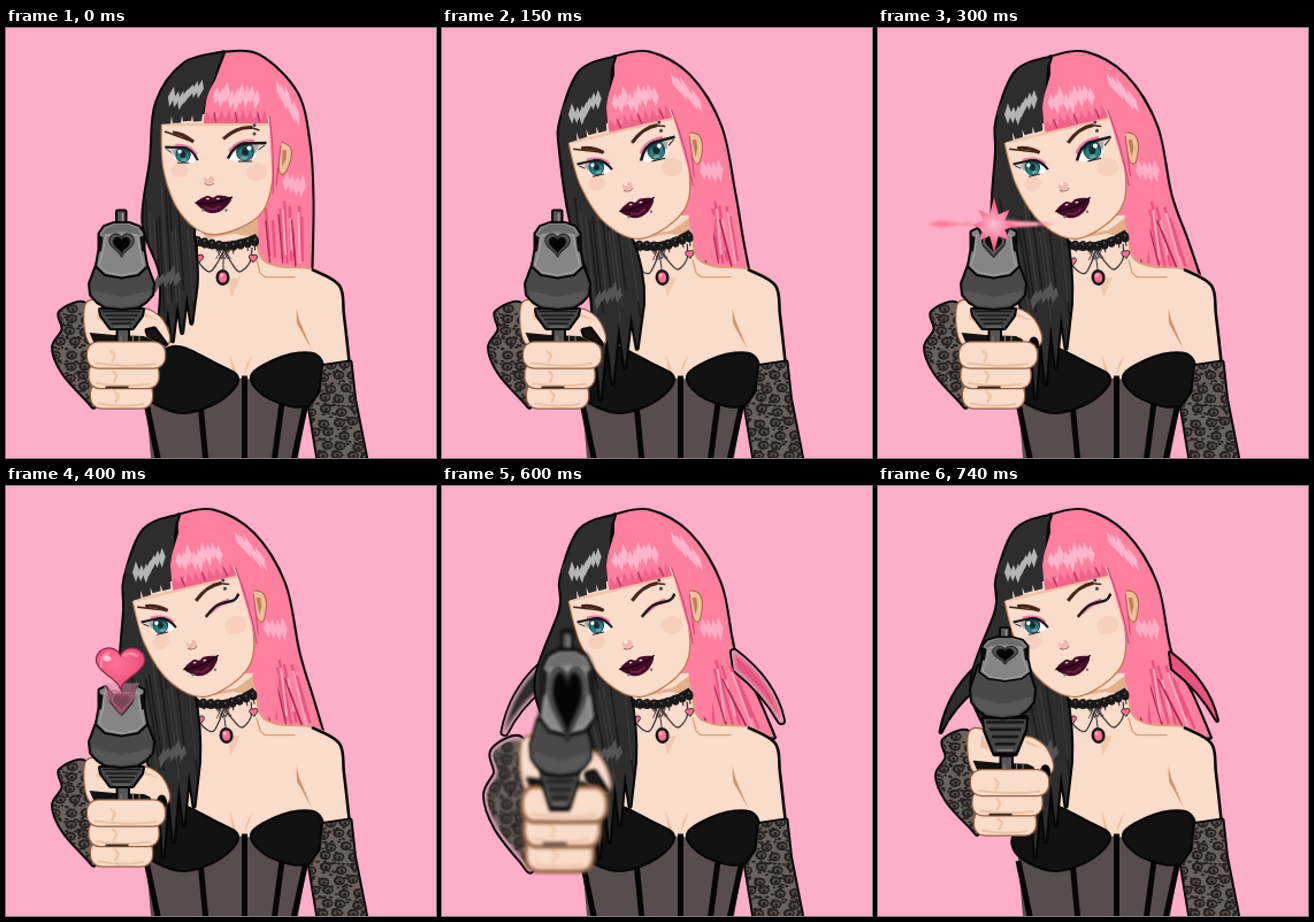
Write an HTML page with a canvas that moves like this. It is 748 px wide and 748 px high and loops after 0.8 s.

```html
<!DOCTYPE html>
<html lang="en">
<meta charset="utf-8">
<title>Heart shot</title>
<style>
html, body { margin: 0; width: 100%; height: 100%; overflow: hidden; background: #ffaec9 }
canvas { display: block; width: 748px; height: 748px; image-rendering: pixelated }
</style>
<canvas id="stage" width="374" height="374"></canvas>
<script>
const ctx = document.getElementById('stage').getContext('2d');
const SKIN = '#fadccb', TAN = '#d9a078', BROWN = '#94603f', INK = '#050505';
const HAIR = '#2d2d2d', PINK = '#ff7f9f', ROSE = '#e9557e', WINE = '#a82c55';

// ---------- helpers ----------
let seed;
const rand = () => (seed = seed * 16807 % 2147483647) / 2147483647;
const mix = (a, b, t) => a + (b - a) * t;

const fill = (color, d) => { ctx.fillStyle = color; ctx.fill(new Path2D(d)); };
const line = (color, width, d) => {
  ctx.strokeStyle = color; ctx.lineWidth = width; ctx.stroke(new Path2D(d));
};
const shape = (color, d, edge = INK, width = 8) => { line(edge, width, d); fill(color, d); };
const oval = (color, x, y, rx, ry = rx) => {
  ctx.fillStyle = color; ctx.beginPath(); ctx.ellipse(x, y, rx, ry, 0, 0, 7); ctx.fill();
};
const group = (draw, x, y, sx = 1, sy = 1, ox = x, oy = y, turn = 0) => {
  ctx.save();
  ctx.translate(x, y); ctx.rotate(turn * Math.PI / 180); ctx.scale(sx, sy); ctx.translate(-ox, -oy);
  draw();
  ctx.restore();
};
// hard offset outline around a blurred shape
const ghost = (color, d) => {
  line(INK, 16, d); line('#dc9fb3', 9, d);
  ctx.filter = 'blur(1.5px)'; fill(color, d); ctx.filter = 'none';
};

const pairs = text => text.match(/-?[\d.]+ -?[\d.]+/g).map(p => p.split(' ').map(Number));
// curve running through all given points
function smooth(text, closed) {
  const p = pairs(text), n = p.length;
  const at = i => p[closed ? (i + n) % n : Math.max(0, Math.min(n - 1, i))];
  let d = 'M' + p[0];
  for (let i = 0; i < n - !closed; i++) {
    const [a, b, c, e] = [-1, 0, 1, 2].map(k => at(i + k));
    d += `C${[0, 1].map(k => b[k] + (c[k] - a[k]) / 6)} ${[0, 1].map(k => c[k] - (e[k] - b[k]) / 6)} ${c}`;
  }
  return d;
}
// symmetric outline from half widths and heights
function mirror(text, axis = 201) {
  const half = pairs(text);
  const side = s => half.map(([w, y]) => [axis + s * w, y]);
  return 'M' + [...side(1), ...side(-1).reverse()].join('L') + 'Z';
}
// row of hair ends along a slope; flat > 0 makes them blunt
function tips(x0, y0, x1, y1, n, long, short = long, flat = 0) {
  let d = '';
  for (let i = 0; i < n; i++) {
    const len = mix(long, short, i / n) * (.8 + rand() * .3);
    for (const [k, l] of [[.5 - flat / 2, len], [.5 + flat / 2, len], [1, 0]]) {
      const t = (i + k) / n;
      d += `L${mix(x0, x1, t)} ${mix(y0, y1, t) + l}`;
    }
  }
  return d;
}
// row of slanted blades of light or shade
function blades(color, x, y, w, rise, h, n, lean = 0) {
  for (let i = 0; i < n; i++) {
    const bx = x + w * i / n, by = y + rise * i / n + (rand() - .5) * h * .5;
    const half = h * (.35 + rand() * .25), thick = w / n * .75;
    fill(color, `M${bx + lean} ${by - half}L${bx + thick} ${by} ${bx - lean} ${by + half} ${bx - thick} ${by}Z`);
  }
}
function strands(color, width, n, x0, x1, y0, x2, x3, y1) {
  for (let i = 0; i < n; i++) {
    const t = (i + rand()) / n, from = rand() * .4, to = .75 + rand() * .25;
    const x = k => mix(mix(x0, x1, t), mix(x2, x3, t), k);
    line(color, width, `M${x(from)} ${mix(y0, y1, from)}L${x(to)} ${mix(y0, y1, to)}`);
  }
}
function heart(x, y, w, h) {
  let d = '';
  for (let a = 0; a < 6.28; a += .1) {
    const hx = Math.sin(a) ** 3;
    const hy = (13 * Math.cos(a) - 5 * Math.cos(2 * a) - 2 * Math.cos(3 * a) - Math.cos(4 * a) + 2.5) / 29;
    d += `${d ? 'L' : 'M'}${x + hx * w / 2} ${y - hy * h}`;
  }
  return d + 'Z';
}

function lace(d, x0, y0, w, h, soft) {
  (soft ? ghost : shape)('#6b625f', d);
  ctx.save();
  ctx.clip(new Path2D(d));
  if (soft) ctx.filter = 'blur(1px)';
  for (let y = y0; y < y0 + h; y += 20) {
    for (let x = x0 + rand() * 14; x < x0 + w; x += 26) {
      const px = x + rand() * 6, py = y + rand() * 8;
      oval('#262222', px, py, 10, 8);
      oval('#5d5451', px + 1, py, 6, 4);
      oval('#262222', px + 1, py + 1, 3);
      for (let i = 0; i < 5; i++) oval('#262222', px + (rand() - .5) * 34, py + 8 + rand() * 8, 2 + rand() * 2, 2);
    }
  }
  ctx.restore();
}

// ---------- body ----------
function body() {
  const shoulder = smooth('436 325 440 392 470 414 535 420 580 448 588 500 597 580');
  fill(SKIN, shoulder + 'L545 600 280 620 280 450 328 400 328 330Z');
  line(TAN, 3, shoulder);
  line(INK, 5, smooth('532 420 580 448 588 500 597 580'));
  fill('#e3b08b', 'M330 342 362 358 400 352 437 325 438 364 396 358 350 366Z');
  line(TAN, 2.5, 'M436 403 442 426 450 433H503');
  fill('#f0c9ae', 'M384 436 408 434 392 468Z');
  fill('#e9b893', 'M389 566 402 604 394 594ZM429 568 414 606 419 585Z');
  fill('#cf966e', 'M505 487 510 507 532 560 506 514Z');

  fill('#584d4e', 'M243 640 252 748 508 748 525 650 415 608Z');
  for (const x of [244, 338, 415, 480, 522]) line(INK, 10, `M${x} ${x === 415 ? 605 : 652}L${mix(x, 415, x < 415 ? .12 : .2)} 750`);
  shape('#111', smooth('290 556 366 586 402 610 373 646 308 668 248 644 238 606', true));
  shape('#111', smooth('428 606 480 574 534 568 550 598 525 655 460 644', true));
  lace('M552 588 599 581 606 645 627 752 543 752 528 660 547 634Z', 520, 582, 110, 170);
}

function choker() {
  const axis = 383;
  line('#181818', 13, 'M329 370Q383 390 437 364');
  for (let i = -4; i <= 4; i++) {
    const x = axis + i * 12.5, y = 381 - Math.abs(i) * 2.5;
    oval('#181818', x, y, 7, 9);
    oval('#6a5a54', x, y - 3, 1.8);
    line('#222', 2, `M${x} ${y}V${y + 8 + rand() * 14}`);
  }
  for (let i = 0; i < 4; i++) line('#433', 1.6, `M${366 + i * 5} 386L${376 + i * 5} 402M${390 - i * 5} 386L${380 - i * 5} 402`);
  for (const s of [-1, 1]) {
    line('#333', 2.5, smooth([[48, 382], [44, 408], [26, 424], [12, 408], [2, 390]].map(([w, y]) => `${axis - 3 + s * w} ${y}`).join(' ')));
    shape('#ff6f91', heart(axis + s * 47, 401, 13, 12), '#222', 3);
  }
  line('#333', 2, 'M378 398V424');
  oval('#151515', 377, 434, 12, 14);
  oval('#ff6f91', 377, 434, 7, 9);
  oval('#ffb3c7', 375, 430, 3);
}

// ---------- hair ----------
function pinkHair({ tilt, right, locks }) {
  const tipY = 419 + Math.max(0, right - 532) * .4;
  const dome = tilt
    ? `300 51 360 43 430 83 484 170 509 290 ${mix(509, right, .55)} 365 ${right} ${tipY}`
    : `378 43 440 48 505 112 527 200 533 300 ${right} ${tipY}`;
  shape(PINK, smooth(dome) + 'L470 420 440 400 300 300Z');
  if (locks) locks(ROSE, 'M508 290Q575 340 590 408Q560 355 512 318Z');
  const top = tilt ? 500 : 522;
  strands(ROSE, 5, 7, 450, top, 290, 460, right - 8, tipY);
  strands('#ffa5bd', 4, 3, 470, top, 290, 480, right - 8, tipY);
  strands(WINE, 2.5, 4, 450, top - 10, 320, 460, right - 12, tipY);
}

function blackHair({ tilt, left, ends, locks }) {
  if (locks) locks(HAIR, 'M172 314Q122 360 109 428Q130 385 170 352Z');
  const crown = tilt ? '300 51 240 76 207 160 206 215' : '378 43 310 62 262 130 252 230';
  const d = smooth(`${crown} ${left} 340 ${left + 30} 430 265 530`)
    + (tilt ? tips(265, 550, ends, 480, 4, 115, 50) : tips(265, 500, ends, 450, 4, 70, 50))
    + `Q${ends + 3} 420 326 358L340 200 ${tilt ? '290 130 294 70' : '344 130 360 90'}Z`;
  shape(HAIR, d);
  ctx.save();
  ctx.clip(new Path2D(d));
  strands('#1b1b1b', 3, 7, left, 310, 250, 250, ends, 520);
  strands('#3a3a3a', 3, 6, left, 310, 250, 250, ends, 520);
  ctx.restore();
  blades('#555', tilt ? 272 : 262, tilt ? 468 : 440, 44, -10, 32, 5, 3);
}

// ---------- head ----------
const lid = 'M-30 12Q-18 -13 0 -14T37 -15';
function eye() {
  line('#e77a9f', 7, 'M-27 0Q-14 -20 16 -18');
  fill('#fff', 'M-30 12Q-18 -13 0 -14L24 -11 19 8 4 17 -20 16Z');
  fill('#aaa', 'M11 -12 24 -11 18 5Z');
  oval('#1c4a52', 0, 0, 16, 17);
  oval('#2f7d80', 0, 4, 13, 11);
  oval('#102c34', 0, 0, 6, 7);
  oval('#69a9a8', -2, 11, 6, 3);
  oval('#fff', 7, -6, 4);
  line('#17171a', 5, lid);
  line('#17171a', 2, 'M-12 17 12 17M23 -3 34 -11');
}
function closedEye() {
  line('#e77a9f', 7, 'M-18 8Q-3 -8 16 -14');
  line('#17171a', 5, smooth('-25 15 -5 -5 24 -14 32 -25'));
}

function head(winking, turn) {
  const face = smooth('272 150 275 245 305 322 360 358 440 325 464 250 462 150');
  line('#bb7c50', 5, face);
  fill(SKIN, face);
  line('#efc5a8', 5, 'M277 168H458');
  oval('#f7cfbd', 302, 248, 15, 13);
  oval('#f7cfbd', 436, 250, 19, 16);
  group(eye, 308, 220, -.85, .85, 0, 0);
  if (winking) group(closedEye, 416, 215, 1, 1, 0, 0, -turn);
  else group(eye, 416, 215, 1, 1, 0, 0);
  line('#472318', 6, 'M326 198Q308 183 290 182M378 193Q402 171 428 173');
  line('#472318', 3, 'M326 198 276 180M426 173 441 178');
  for (const y of [169, 184]) oval('#444', 432, y, 3);

  oval('#f3b7ad', 353, 264, 9, 7);
  oval('#fff0ea', 351, 260, 3);
  line('#9a716b', 2, 'M345 270Q353 277 362 270');
  fill('#430a28', smooth('331 303 350 292 360 295 370 291 392 297 376 317 356 322 340 314', true));
  line('#170611', 3, 'M329 304Q362 309 394 294');
  line('#74244b', 3, 'M347 312 360 316 374 310');
  for (const x of [351, 369]) oval('#f4d4df', x, 297, 3, 1.5);
  for (const x of [343, 383]) oval('#777', x, 317, 2.5);

  // ear, fringe with side lock, shine
  shape('#efc09b', smooth('477 203 493 207 495 226 484 252 476 246', true), '#a8663e', 4);
  fill('#bb7e56', 'M481 212 488 213 487 228 480 242Z');
  const fringe = 'M376 70 350 115 344 156' + tips(344, 146, 456, 148, 5, 18, 18, .8) + 'L458 160 464 290 472 270 479 200 476 130 440 80Z';
  fill(PINK, fringe);
  fill('#f0648a', 'M344 158' + tips(344, 158, 456, 160, 9, -16) + 'V166H344Z');
  for (const x of [362, 399, 438]) line(WINE, 2, `M${x} 147l3 17`);
  line('#c8426c', 2, 'M458 152Q468 220 464 290M478 204 470 275');
  fill(HAIR, 'M365 80 330 68 290 88 270 112 266 168' + tips(270, 154, 342, 150, 4, 13, 13, .8) + 'L348 125Z');
  blades('#b5b5b5', 288, 124, 58, -18, 30, 7, 4);
  blades('#ffb5ca', 366, 116, 78, 0, 36, 9, 2);
  blades('#ffb5ca', 476, 118, 36, 34, 46, 5, -5);
  blades('#ffadc4', 488, 275, 36, -10, 44, 4, 2);
}

// ---------- arm and gun ----------
function hand(pulled, soft) {
  const gap = soft ? 11 : 5;
  shape(SKIN, smooth('138 484 164 478 195 524 232 489 270 506 281 550 215 556 148 550', true), BROWN, 5);
  fill('#eec3a5', 'M160 484 187 520 158 506ZM234 492 270 510 240 502Z');
  fill('#111', 'M145 530 188 534 240 536 268 549 274 562 152 546Z');
  shape('#555', 'M195 524H212V552H195Z');
  for (const x of [200, 221, 232]) line('#888', 2, `M${x} 536V551`);
  if (pulled) {
    fill(SKIN, 'M236 510 268 512 278 534 256 552Z');
    oval(INK, 271, 550, 9, 13);
  } else shape('#151515', 'M245 526 258 523 278 550 248 535Z');
  for (let i = 2; i >= 0; i--) {
    const x = 142 + i * 3, y = 547 + i * 35, w = 134 - i * 14;
    ctx.beginPath(); ctx.roundRect(x, y, w, 44, 18);
    ctx.strokeStyle = BROWN; ctx.lineWidth = gap; ctx.stroke();
    ctx.fillStyle = SKIN; ctx.fill();
    line('#ecc2a3', 4, `M${x + 12} ${y + 36}Q${x + w / 2} ${y + 44} ${x + w - 14} ${y + 37}M${x + 40} ${y + 14}l8 9 -6 12`);
  }
  line('#3d2924', 4, 'M173 625H213');
}

function slide(fired, hole) {
  const foot = '38 385 43 414 28 428 0 433';
  if (!fired) {
    shape('#555', 'M194 319H207V344H194Z');
    line('#999', 3, 'M203 322V342');
  }
  shape('#858585', mirror((fired ? '0 398 20 365 28 350 38 355 ' : '14 340 30 346 38 358 ') + foot));
  if (!fired) fill('#6c6c6c', mirror('12 342 27 349 35 361 22 357 0 354'));
  line('#a5a5a5', 2, mirror(`${fired ? 30 : 27} 360 32 388 39 413 26 425 0 430`));
  for (const s of [-1, 1]) fill('#0c0c0c', `M${201 + s * 40} 360l${-s * 8} 4 ${s * 3} 24 ${s * 5} 2Z`);
  if (fired) {
    shape('#444', mirror('12 366 24 352 18 378 0 398'), '#111', 3);
    shape('#0a0a0a', heart(201, 377, 30, 29), '#777', 3);
  } else {
    const [w, h] = hole, y = 359 + h / 2;
    shape('#555', heart(201, y, w + 12, h), '#222', 4);
    shape(INK, heart(201, y, w, h - 10), '#333', 3);
  }
}

function receiver() {
  shape('#494949', mirror('42 410 55 445 53 464 42 476 28 485 0 488'));
  fill('#575757', mirror('0 468 52 456 47 470 28 482 0 485'));
}

function rail() {
  shape('#484848', mirror('37 490 35 500 19 522'));
  for (let i = 0; i < 4; i++) line('#181818', 3, `M${168 + i * 5} ${493 + i * 7}H${234 - i * 5}`);
  line('#777', 2, 'M187 520H215');
}

const sleeve = smooth('140 483 94 494 99 525 82 556 99 600 140 646 154 655 145 580', true);
// each part: x, y, horizontal and vertical scale
const poses = {
  aim: { hand: [140, 478, 1, 1], rail: [201, 488, 1, 1], receiver: [201, 414, 1, 1], slide: [201, 318, 1, 1], hole: [29, 38] },
  rush: { hand: [140, 442, 1.06, 1.23], rail: [205, 490, .85, 2], receiver: [207, 412, .94, 1.22], slide: [218, 254, 1.08, 1.54], hole: [46, 82] },
  near: { hand: [160, 426, 1, .99], rail: [221, 402, 1, 1.8], receiver: [217, 318, 1, 1.14], slide: [221, 247, 1, .79], hole: [29, 38] }
};

function arm(name, fired) {
  const pose = poses[name], soft = name === 'rush';
  const blur = soft ? 'blur(1.8px)' : 'none';
  group(() => {
    lace(sleeve, 78, 482, 80, 175, soft);
    ctx.filter = blur;
    hand(fired || name === 'near', soft);
  }, ...pose.hand, 140, 478);
  ctx.filter = blur;
  group(rail, ...pose.rail, 201, 488);
  group(receiver, ...pose.receiver, 201, 414);
  group(() => slide(fired, pose.hole), ...pose.slide, 201, 318);
  ctx.filter = 'none';
}

// ---------- effects ----------
function glow(x, y, r, inner, outer) {
  const g = ctx.createRadialGradient(x, y, 0, x, y, r);
  g.addColorStop(0, inner); g.addColorStop(1, outer);
  return g;
}

function muzzleFlash() {
  ctx.filter = 'blur(1px)';
  fill('#ff7b9d', 'M89 341 105 335 145 340 222 334 312 341 222 348 145 343 107 347Z');
  line('#ffc2d2', 4, 'M160 341H278');
  ctx.filter = 'none';
  let star = '';
  for (let i = 0; i < 16; i++) {
    const a = i * Math.PI / 8 - Math.PI / 2, r = i % 2 ? 20 : i % 8 ? 38 : 48;
    star += `${i ? 'L' : 'M'}${202 + Math.cos(a) * r} ${343 + Math.sin(a) * r}`;
  }
  fill(glow(202, 342, 44, '#ffc0d0', '#ff4f7f'), star + 'Z');
}

function heartShot() {
  ctx.globalAlpha = .5;
  fill('#dc8ba5', mirror('32 343 24 367 0 398', 200));
  for (const w of [48, 36, 25]) line('#a5385f', 3, heart(200, 376, w, w * .85));
  ctx.globalAlpha = 1;
  shape(glow(193, 308, 52, '#ff7296', '#e94b79'), heart(199, 317, 82, 68), '#8e2849', 5);
  line('#ff88a7', 5, 'M166 316Q163 292 181 291M205 296Q217 286 229 297');
  oval('#ffc1d1', 176, 300, 7, 5);
}

// ---------- timeline ----------
const kick = { tilt: true, left: 200, ends: 336, fired: true, arm: 'aim' };
const fly = { tilt: true, left: 163, ends: 336, right: 578, winking: true };
const scenes = [
  { until: 150, left: 239, ends: 331, right: 531, arm: 'aim' },
  { until: 300, tilt: true, left: 225, ends: 350, right: 532, arm: 'aim' },
  { until: 400, ...kick, right: 558, effect: muzzleFlash },
  { until: 500, ...kick, right: 550, winking: true, effect: heartShot },
  { until: 600, flash: true },
  { until: 650, ...fly, arm: 'rush', locks: ghost },
  { until: 800, ...fly, arm: 'near', locks: shape }
];

function draw(s) {
  seed = 11;
  ctx.setTransform(.5, 0, 0, .5, 0, 0);
  ctx.lineJoin = 'round';
  ctx.fillStyle = s.flash ? '#ff7297' : '#ffaec9';
  ctx.fillRect(0, 0, 748, 748);
  if (s.flash) return oval('#b03b60', 68, 245, 1.5);

  const turn = s.tilt ? -13.3 : 0;
  pinkHair(s);
  body();
  if (s.tilt) fill(PINK, 'M424 250 430 340 446 393 468 412 475 330Z');
  group(choker, 380, 390, 1, 1, 380, 390, turn * .6);
  blackHair(s);
  group(() => head(s.winking, turn), s.tilt ? 265 : 305, s.tilt ? 240 : 217, 1, 1, 305, 217, turn);
  arm(s.arm, s.fired);
  if (s.effect) s.effect();
}

let shown;
function tick() {
  const t = performance.now() % 800;
  const scene = scenes.find(s => t < s.until);
  if (scene !== shown) draw(shown = scene);
  requestAnimationFrame(tick);
}
tick();
</script>
</html>
```
